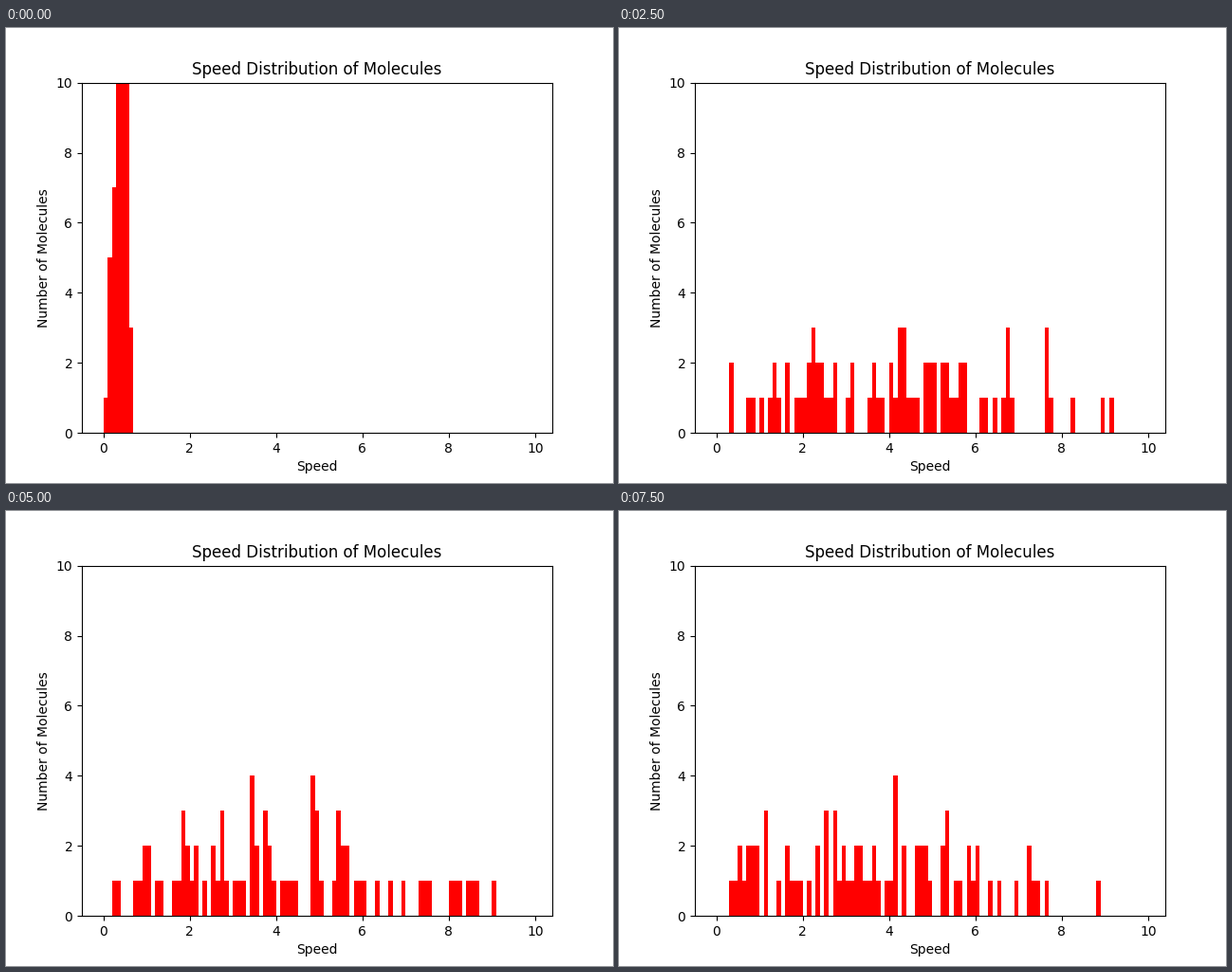
Animation of 640x480 px, one loop 8 s. Source, as a matplotlib script:

```python
import numpy as np
import matplotlib.pyplot as plt
from matplotlib.animation import FuncAnimation

FRAMES, INTERVAL = 16, 500
MOLECULES = 80
HOT = 3.2       # Rayleigh scale of the settled speeds
COLLIDE = 0.7   # chance that a molecule gets a new speed per step
EDGES = np.arange(0, 10, 0.1)


def simulate():
    """Speeds at each step: slow start, slight warming, then a hot gas."""
    rng = np.random.default_rng(12)
    below = [0, 1, 6, 13, 33, 55, 77, MOLECULES]  # molecules under each edge
    slow = np.interp(np.arange(MOLECULES) + 0.5, below, EDGES[:len(below)])
    steps = [slow, slow * 1.02, slow * rng.uniform(0.7, 1.15, MOLECULES)]
    speeds = rng.rayleigh(HOT, MOLECULES)
    while len(steps) < FRAMES:
        steps.append(speeds)
        hit = rng.random(MOLECULES) < COLLIDE
        speeds = np.where(hit, rng.rayleigh(HOT, MOLECULES), speeds)
    return steps


counts = [np.histogram(speeds, EDGES)[0] for speeds in simulate()]

fig, ax = plt.subplots(figsize=(6.4, 4.8), dpi=100)
bars = ax.bar(EDGES[:-1], counts[0], width=np.diff(EDGES), align="edge",
              color="red")
ax.set_xlim(-0.495, 10.395)
ax.set_ylim(0, 10)
ax.set_title("Speed Distribution of Molecules")
ax.set_xlabel("Speed")
ax.set_ylabel("Number of Molecules")


def update(i):
    for bar, n in zip(bars, counts[i]):
        bar.set_height(n)
    return bars.patches


anim = FuncAnimation(fig, update, frames=FRAMES, interval=INTERVAL,
                     repeat=True, repeat_delay=0)
plt.show()
```
